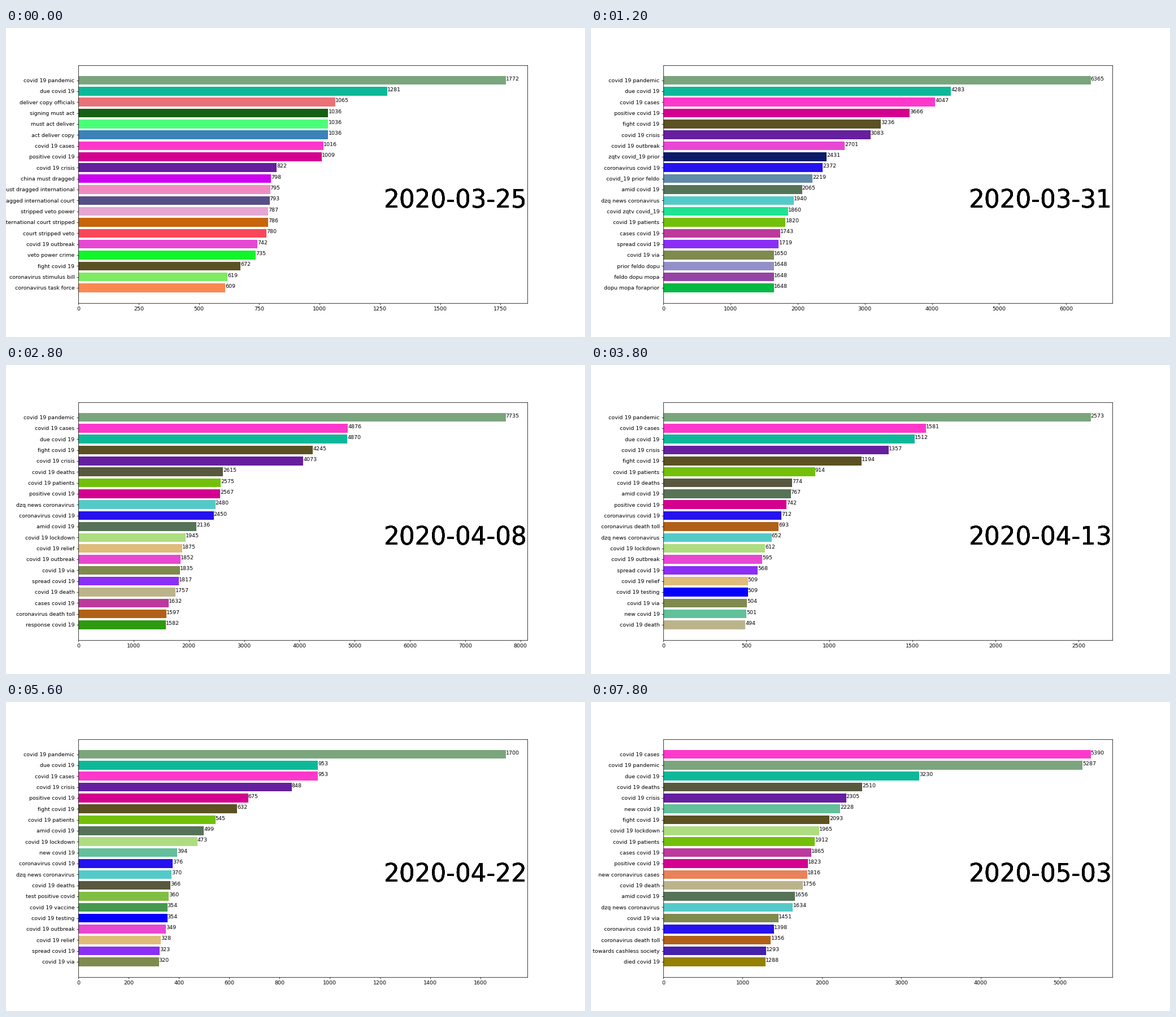
A matplotlib script that plays this animation: 1025x547 px, repeating every 8000 ms.

```python
import matplotlib.pyplot as plt
from matplotlib.animation import FuncAnimation
import numpy as np

W, H, DPI = 1025, 547, 64
SCALE = W / 15 / DPI          # layout is designed for a figure 15 inches wide
FRAMES, INTERVAL = 40, 200
START = np.datetime64("2020-03-25")
ROWS = 20

COLORS = {
    "covid 19 pandemic": "#7ba57d",
    "due covid 19": "#0db899",
    "deliver copy officials": "#e87278",
    "signing must act": "#146014",
    "must act deliver": "#4aff78",
    "act deliver copy": "#3a82b8",
    "covid 19 cases": "#ff38cc",
    "positive covid 19": "#d4008f",
    "covid 19 crisis": "#661f9f",
    "china must dragged": "#cd00f2",
    "must dragged international": "#f08cc2",
    "dragged international court": "#554f86",
    "stripped veto power": "#e6a6d2",
    "international court stripped": "#c8640a",
    "court stripped veto": "#fa4659",
    "covid 19 outbreak": "#e747d3",
    "veto power crime": "#12f52a",
    "fight covid 19": "#5b5122",
    "coronavirus stimulus bill": "#7eeb62",
    "coronavirus task force": "#fb8850",
    "zqtv covid_19 prior": "#0c1b68",
    "coronavirus covid 19": "#2612ee",
    "covid_19 prior feldo": "#5f8ba9",
    "amid covid 19": "#567358",
    "dzq news coronavirus": "#54cac8",
    "covid zqtv covid_19": "#20e291",
    "covid 19 patients": "#72c009",
    "cases covid 19": "#bb3a9c",
    "spread covid 19": "#8a2ff5",
    "covid 19 via": "#7f8a4e",
    "prior feldo dopu": "#9290c8",
    "feldo dopu mopa": "#9544a4",
    "dopu mopa foraprior": "#06b945",
    "covid 19 deaths": "#58583f",
    "covid 19 lockdown": "#aedd81",
    "covid 19 relief": "#dfbc7a",
    "covid 19 death": "#bbb48b",
    "coronavirus death toll": "#b06018",
    "response covid 19": "#2e9a0e",
    "covid 19 testing": "#0500fa",
    "new covid 19": "#62c09b",
    "stay at home": "#525f90",
    "death toll 50": "#a56cd8",
    "died covid 19": "#948003",
    "test positive covid": "#80be42",
    "covid 19 vaccine": "#45984e",
    "covid 19 briefing": "#d39263",
    "dr tarnvold covid": "#0499f1",
    "tarnvold covid 19": "#9c4c12",
    "new coronavirus cases": "#e88258",
    "towards cashless society": "#4520aa",
}

# Ranked phrase counts on a few days; the days between are interpolated.
RANKINGS = {
    0: """covid 19 pandemic 1772, due covid 19 1281, deliver copy officials 1065,
        signing must act 1036, must act deliver 1036, act deliver copy 1036,
        covid 19 cases 1016, positive covid 19 1009, covid 19 crisis 822,
        china must dragged 798, must dragged international 795,
        dragged international court 793, stripped veto power 787,
        international court stripped 786, court stripped veto 780,
        covid 19 outbreak 742, veto power crime 735, fight covid 19 672,
        coronavirus stimulus bill 619, coronavirus task force 609""",
    6: """covid 19 pandemic 6365, due covid 19 4283, covid 19 cases 4047,
        positive covid 19 3666, fight covid 19 3236, covid 19 crisis 3083,
        covid 19 outbreak 2701, zqtv covid_19 prior 2431,
        coronavirus covid 19 2372, covid_19 prior feldo 2219,
        amid covid 19 2065, dzq news coronavirus 1940,
        covid zqtv covid_19 1860, covid 19 patients 1820, cases covid 19 1743,
        spread covid 19 1719, covid 19 via 1650, prior feldo dopu 1648,
        feldo dopu mopa 1648, dopu mopa foraprior 1648""",
    14: """covid 19 pandemic 7735, covid 19 cases 4876, due covid 19 4870,
        fight covid 19 4245, covid 19 crisis 4073, covid 19 deaths 2615,
        covid 19 patients 2575, positive covid 19 2567,
        dzq news coronavirus 2480, coronavirus covid 19 2450,
        amid covid 19 2136, covid 19 lockdown 1945, covid 19 relief 1875,
        covid 19 outbreak 1852, covid 19 via 1835, spread covid 19 1817,
        covid 19 death 1757, cases covid 19 1632,
        coronavirus death toll 1597, response covid 19 1582""",
    23: """covid 19 pandemic 1067, covid 19 cases 642, due covid 19 593,
        covid 19 crisis 563, fight covid 19 433, covid 19 patients 399,
        coronavirus death toll 355, amid covid 19 338, covid 19 deaths 292,
        positive covid 19 275, coronavirus covid 19 265,
        covid 19 testing 246, covid 19 lockdown 243, covid 19 outbreak 240,
        new covid 19 239, stay at home 231, death toll 50 225,
        died covid 19 225, spread covid 19 224, dzq news coronavirus 224""",
    28: """covid 19 pandemic 1700, due covid 19 953, covid 19 cases 953,
        covid 19 crisis 848, positive covid 19 675, fight covid 19 632,
        covid 19 patients 545, amid covid 19 499, covid 19 lockdown 473,
        new covid 19 394, coronavirus covid 19 376,
        dzq news coronavirus 370, covid 19 deaths 366,
        test positive covid 360, covid 19 vaccine 354, covid 19 testing 354,
        covid 19 outbreak 349, covid 19 relief 328, spread covid 19 323,
        covid 19 via 320""",
    32: """covid 19 pandemic 6100, covid 19 cases 5169, covid 19 patients 4076,
        due covid 19 3286, covid 19 lockdown 3131, fight covid 19 3084,
        covid 19 crisis 2532, positive covid 19 2243, covid 19 deaths 2081,
        cases covid 19 2061, spread covid 19 2050, amid covid 19 1858,
        dzq news coronavirus 1857, new covid 19 1729,
        coronavirus death toll 1708, covid 19 briefing 1619,
        dr tarnvold covid 1512, covid 19 vaccine 1505,
        tarnvold covid 19 1484, covid 19 death 1385""",
    39: """covid 19 cases 5390, covid 19 pandemic 5287, due covid 19 3230,
        covid 19 deaths 2510, covid 19 crisis 2305, new covid 19 2228,
        fight covid 19 2093, covid 19 lockdown 1965, covid 19 patients 1912,
        cases covid 19 1865, positive covid 19 1823,
        new coronavirus cases 1816, covid 19 death 1756, amid covid 19 1656,
        dzq news coronavirus 1634, covid 19 via 1451,
        coronavirus covid 19 1398, coronavirus death toll 1356,
        towards cashless society 1293, died covid 19 1288""",
}


def parse(block):
    pairs = (item.strip().rsplit(" ", 1) for item in block.split(","))
    return {name: int(count) for name, count in pairs}


DAYS = list(RANKINGS)
COUNTS = [parse(block) for block in RANKINGS.values()]


def top_phrases(day):
    """Return the leading (phrase, count) pairs, largest first."""
    k = max(i for i, d in enumerate(DAYS) if d <= day)
    n = min(k + 1, len(DAYS) - 1)
    a, b = COUNTS[k], COUNTS[n]
    t = (day - DAYS[k]) / max(DAYS[n] - DAYS[k], 1)
    low_a, low_b = 0.8 * min(a.values()), 0.8 * min(b.values())
    mixed = {}
    for name in [*a, *(p for p in b if p not in a)]:
        va, vb = a.get(name, low_a), b.get(name, low_b)
        mixed[name] = round(va * (vb / va) ** t)
    return sorted(mixed.items(), key=lambda item: -item[1])[:ROWS]


plt.rcParams.update({
    "font.family": "DejaVu Sans",
    "font.size": 10 * SCALE,
    "axes.linewidth": 0.8 * SCALE,
})
for axis in ("xtick", "ytick"):
    plt.rcParams.update({
        f"{axis}.major.size": 3.5 * SCALE,
        f"{axis}.major.pad": 3.5 * SCALE,
        f"{axis}.major.width": 0.8 * SCALE,
    })

fig, ax = plt.subplots(figsize=(W / DPI, H / DPI), dpi=DPI)
fig.subplots_adjust(left=0.125, right=0.9, bottom=0.11, top=0.88)


def draw(day):
    ax.clear()
    names, counts = zip(*reversed(top_phrases(day)))
    ax.barh(names, counts, color=[COLORS[name] for name in names])
    for row, count in enumerate(counts):
        ax.text(count, row, str(count))
    # Stacked copies harden the edges of the large date.
    for _ in range(6):
        ax.text(1, 0.4, str(START + day), transform=ax.transAxes,
                size=46 * SCALE, ha="right")


anim = FuncAnimation(fig, draw, frames=FRAMES, interval=INTERVAL, repeat=True)
plt.show()
```
